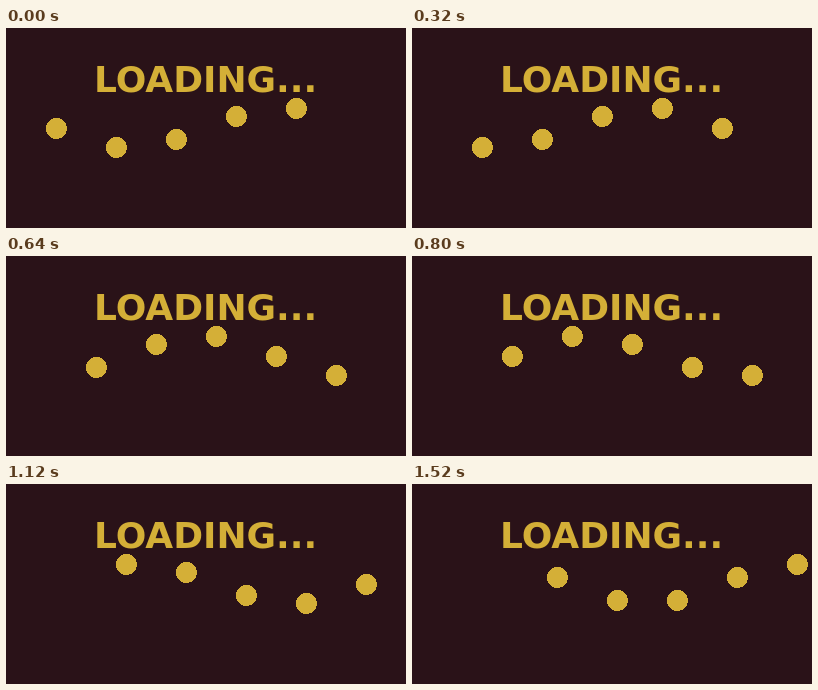
Animation of 400x200 px, one loop 1.6 s. Source, as an HTML page:

```html
<!DOCTYPE html>
<html lang="en">
<head>
<meta charset="utf-8">
<title>Loading</title>
<style>
  html, body { margin: 0; width: 100%; height: 100%; overflow: hidden; background: #2a1218; }
  svg { display: block; width: 400px; height: 200px; }
  text { font: bold 36px "DejaVu Sans", sans-serif; }
</style>
</head>
<body>
<svg viewBox="0 0 400 200" fill="#d4af37">
  <rect width="400" height="200" fill="#2a1218"/>
  <text x="88" y="64">LOADING...</text>
  <g id="dots" shape-rendering="crispEdges"></g>
</svg>
<script>
  const STEP = 80, STEPS = 20, COUNT = 5;
  const group = document.getElementById("dots");
  const dots = Array.from({ length: COUNT }, () => {
    const dot = document.createElementNS("http://www.w3.org/2000/svg", "circle");
    dot.setAttribute("r", 10.58);
    return group.appendChild(dot);
  });

  function draw(ms) {
    const step = Math.floor(ms / STEP) % STEPS;
    dots.forEach((dot, i) => {
      const phase = 2 * Math.PI * (step / STEPS + i / COUNT);
      const y = Math.floor(100 + 20 * Math.sin(phase) + 1e-6);
      dot.setAttribute("cx", 50.5 + 60 * i + 5 * step);
      dot.setAttribute("cy", y + 0.5);
    });
  }

  const start = performance.now();
  function tick() {
    draw(performance.now() - start);
    requestAnimationFrame(tick);
  }
  draw(0);
  requestAnimationFrame(tick);
</script>
</body>
</html>
```
